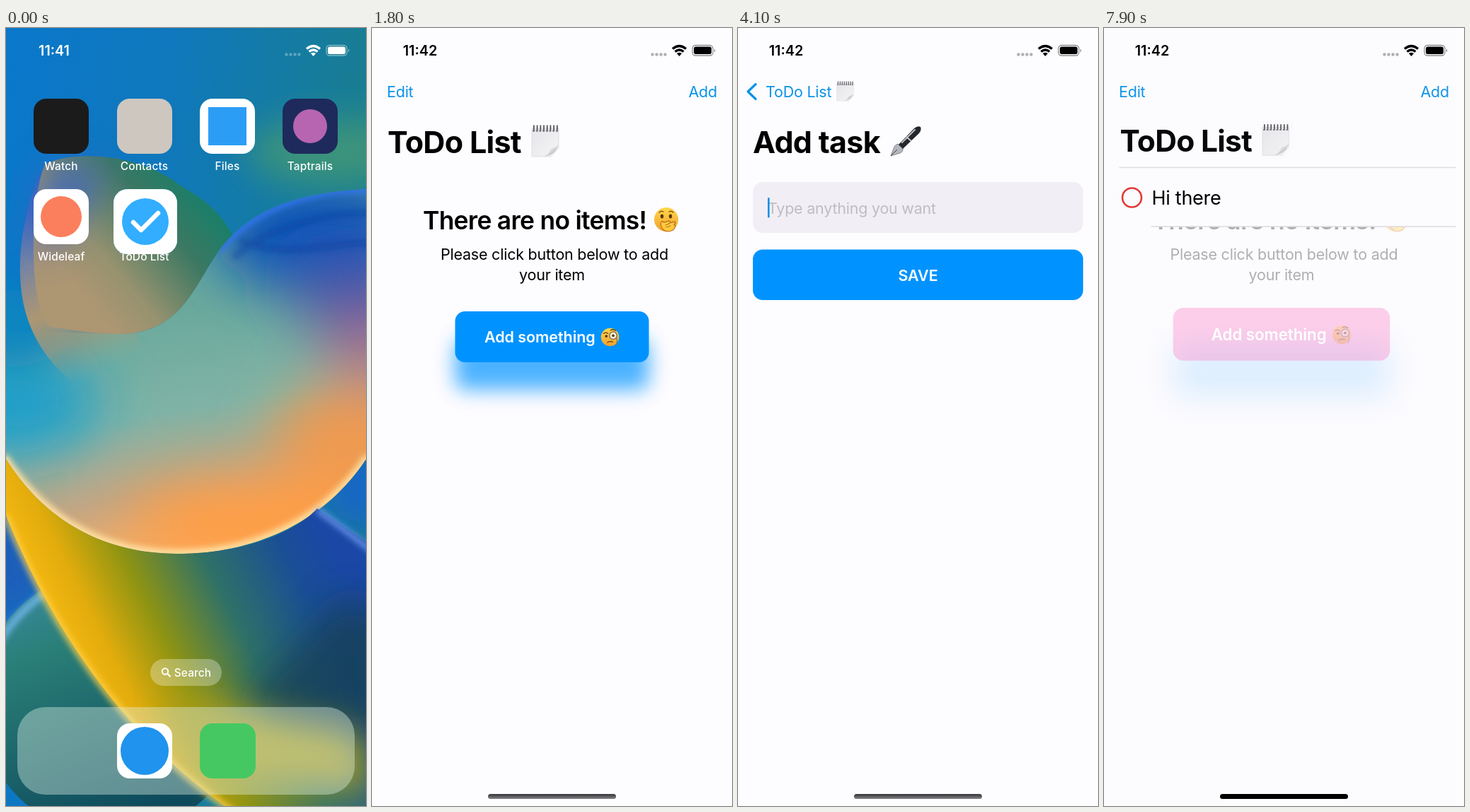
Write an HTML page that moves like this. It is 509 by 1101 pixels and loops after 8000 ms.

```html
<!DOCTYPE html>
<html lang="en">
<head>
<meta charset="utf-8">
<title>ToDo List</title>
<style>
  html, body { margin: 0; width: 100%; height: 100%; overflow: hidden; background: #fdfcff; }
  svg { display: block; }
  #scene { width: 509px; height: 1101px; }
  text {
    font-family: Inter, "Open Sans", sans-serif; font-size: 21.5px; letter-spacing: -.0105em;
    font-optical-sizing: none; dominant-baseline: central; white-space: pre;
  }
  .mid { text-anchor: middle; }
  .semi { font-weight: 600; letter-spacing: -.003em; }
  .big { font-size: 43px; font-weight: 700; letter-spacing: -.016em; }
  .head { font-size: 35.4px; font-weight: 600; letter-spacing: -.02em; }
  .entry { font-size: 27px; }
  .time { font-size: 19.8px; font-weight: 600; letter-spacing: 0; text-anchor: middle; }
  .label text { font-size: 15.4px; font-weight: 500; letter-spacing: .01em; text-anchor: middle; fill: #fff; }
  .blue { fill: #0a93e8; }
  .line { fill: none; stroke-linecap: round; stroke-linejoin: round; }
  .soft { filter: url(#soft); }
  .haze { filter: url(#haze); }
  .rim { fill: none; filter: url(#rim); }
</style>
</head>
<body>
<svg id="scene" viewBox="0 0 509 1101" xmlns="http://www.w3.org/2000/svg">
  <defs>
    <filter id="soft" x="-60%" y="-60%" width="220%" height="220%"><feGaussianBlur stdDeviation="26"/></filter>
    <filter id="haze" x="-60%" y="-60%" width="220%" height="220%"><feGaussianBlur stdDeviation="40"/></filter>
    <filter id="rim" x="-20%" y="-20%" width="140%" height="140%"><feGaussianBlur stdDeviation="4"/></filter>
    <filter id="glow" filterUnits="userSpaceOnUse" x="-100" y="280" width="709" height="450">
      <feGaussianBlur id="glowBlur" stdDeviation="14"/>
    </filter>
    <linearGradient id="sky" x2="1" y2=".25">
      <stop offset="0" stop-color="#0877cf"/><stop offset=".45" stop-color="#0f78bd"/><stop offset="1" stop-color="#1b7f86"/>
    </linearGradient>
    <linearGradient id="ring" gradientUnits="userSpaceOnUse" x1="50" y1="250" x2="170" y2="510">
      <stop offset="0" stop-color="#3c68c0"/><stop offset=".25" stop-color="#7b86a0"/>
      <stop offset=".5" stop-color="#ad9672"/><stop offset=".68" stop-color="#a39b7c" stop-opacity=".7"/>
      <stop offset=".88" stop-color="#8aa890" stop-opacity="0"/>
    </linearGradient>
    <linearGradient id="dome" gradientUnits="userSpaceOnUse" x1="290" y1="230" x2="110" y2="380">
      <stop offset="0" stop-color="#12806a"/><stop offset=".35" stop-color="#3c7862"/>
      <stop offset=".75" stop-color="#97926f"/><stop offset="1" stop-color="#ad9672"/>
    </linearGradient>
    <linearGradient id="body" gradientUnits="userSpaceOnUse" x1="200" y1="400" x2="260" y2="740">
      <stop offset="0" stop-color="#6aa99c"/><stop offset=".42" stop-color="#7fb3a6"/>
      <stop offset=".75" stop-color="#c2a684"/><stop offset="1" stop-color="#fbb066"/>
    </linearGradient>
    <linearGradient id="band" gradientUnits="userSpaceOnUse" x1="60" y1="880" x2="440" y2="690">
      <stop offset="0" stop-color="#fdbd14"/><stop offset=".18" stop-color="#e2ac0c"/><stop offset=".36" stop-color="#8f9412"/>
      <stop offset=".6" stop-color="#2f7167"/><stop offset=".85" stop-color="#1a4f96"/><stop offset="1" stop-color="#1b47a6"/>
    </linearGradient>
    <linearGradient id="ball" x2=".4" y2="1">
      <stop offset="0" stop-color="#3f8fb0"/><stop offset=".35" stop-color="#2a7f78"/><stop offset="1" stop-color="#0d4a5c"/>
    </linearGradient>
    <linearGradient id="paper" x2="1" y2="1"><stop offset="0" stop-color="#e6e6ea"/><stop offset="1" stop-color="#f4f4f6"/></linearGradient>
    <linearGradient id="curl" x2="1" y2="1"><stop offset=".3" stop-color="#fff"/><stop offset="1" stop-color="#8f9097"/></linearGradient>
    <linearGradient id="skin" x2="0" y2="1"><stop offset="0" stop-color="#ffd84a"/><stop offset="1" stop-color="#f0a02c"/></linearGradient>
    <linearGradient id="ink" x2=".7" y2=".7"><stop offset=".25" stop-color="#8d9198"/><stop offset=".6" stop-color="#25272c"/></linearGradient>
    <linearGradient id="grip" x2="0" y2="1"><stop offset="0" stop-color="#333336"/><stop offset="1" stop-color="#85858a"/></linearGradient>
    <clipPath id="bodyClip"><path id="bodyPath" d="M-60 430H60L160 433C262 433 270 340 320 293C365 250 430 225 570 227V500Q550 560 509 610C450 700 350 744 243 744C130 744 50 690 0 610L-60 560Z"/></clipPath>
    <clipPath id="window"><rect id="frame"/></clipPath>

    <symbol id="note" viewBox="0 0 40 46">
      <path d="M1 5H39V33Q34 38 28 45H1Z" fill="url(#paper)" stroke="#d2d2d8" stroke-width=".6"/>
      <path d="M39 27Q35 44 16 45Q27 42 28 33Q36 33 39 27Z" fill="url(#curl)"/>
      <path d="M3 5H38" stroke="#55565c" stroke-width="9" stroke-dasharray="1.8 2.9"/>
      <path d="M2 8.5H38" stroke="#77787e" stroke-width="2" stroke-dasharray="2.6 2.1"/>
    </symbol>
    <symbol id="hush" viewBox="0 0 36 36">
      <circle cx="18" cy="18" r="17" fill="url(#skin)"/>
      <g fill="#5b3512"><ellipse cx="12" cy="13.5" rx="2.2" ry="3"/><ellipse cx="24" cy="13.5" rx="2.2" ry="3"/></g>
      <path class="line" d="M8 8Q11 5 14 7M22 7Q25 5 28 8" stroke="#8a541c" stroke-width="1.4"/>
      <path d="M10 24Q11 19 15 22L22 20Q25 21 23 23L30 21Q32 23 29 25L31 27Q30 34 21 35Q12 35 10 24Z" fill="#ffc93c" stroke="#b8691c" stroke-width="1.2"/>
      <path class="line" d="M22 24L17 26M24 27L18 29" stroke="#b8691c" stroke-width="1"/>
    </symbol>
    <symbol id="monocle" viewBox="0 0 36 36">
      <circle cx="18" cy="18" r="17" fill="url(#skin)"/>
      <circle cx="24" cy="15" r="7" fill="#fff3cf" stroke="#77716b" stroke-width="2"/>
      <path class="line" d="M30 19Q33 27 29 33" stroke="#77716b" stroke-width="1.5"/>
      <g fill="#5b3512"><circle cx="11" cy="16" r="2.5"/><circle cx="24" cy="15" r="2.5"/></g>
      <path class="line" d="M6 11Q10 8 14 11M19 5Q24 2 29 6M13 28Q18 25 23 27" stroke="#6b3c12" stroke-width="1.8"/>
    </symbol>
    <symbol id="pen" viewBox="0 0 44 44">
      <path d="M1 43L6 30Q9 25 13 27L18 32Q19 37 14 39Z" fill="#b4b7bd" stroke="#70747b" stroke-width=".8"/>
      <path d="M1 43L10 34" stroke="#444" stroke-width="1"/>
      <path d="M12 27L34 4Q39 0 43 2Q45 6 41 11L18 33Z" fill="url(#ink)"/>
      <path d="M17 24L35 6" stroke="#b9bdc4" stroke-width="2.2" stroke-linecap="round"/>
      <path d="M23 16L30 22" stroke="#c5c8cd" stroke-width="2"/>
    </symbol>
    <g id="signal">
      <g opacity=".3" fill="currentColor"><circle cx="396.500" cy="37.500" r="2.200"/><circle cx="402.500" cy="37.500" r="2.200"/><circle cx="408.500" cy="37.500" r="2.200"/><circle cx="414.500" cy="37.500" r="2.200"/></g>
      <g fill="none" stroke="currentColor" stroke-width="3.2"><path d="M425 29.500Q434.500 21.500 444 29.500M428.500 33.500Q434.500 28.500 440.500 33.500"/></g>
      <path d="M431 36Q434.500 33.500 438 36L434.500 40Z" fill="currentColor"/>
      <rect x="453" y="24.500" width="29" height="14.500" rx="4.500" fill="none" stroke="currentColor" stroke-opacity=".45" stroke-width="1.300"/>
      <rect x="455" y="26.500" width="25" height="10.500" rx="2.800" fill="currentColor"/>
      <path d="M484 29.500Q486.500 32 484 34.500Z" fill="currentColor" opacity=".5"/>
    </g>
  </defs>

  <g id="home">
    <rect x="-60" y="-60" width="629" height="1221" fill="url(#sky)"/>
    <g class="soft">
      <ellipse cx="460" cy="175" rx="120" ry="45" fill="#3d9479"/>
      <ellipse cx="500" cy="650" rx="60" ry="70" fill="#1767c4"/>
      <ellipse cx="0" cy="760" rx="70" ry="80" fill="#1c5fba"/>
    </g>
    <use href="#bodyPath" fill="url(#body)"/>
    <g clip-path="url(#bodyClip)">
      <g class="haze">
        <ellipse cx="0" cy="530" rx="130" ry="75" fill="#1d9fcb"/>
        <ellipse cx="440" cy="290" rx="150" ry="85" fill="#0f55b8"/>
        <ellipse cx="500" cy="385" rx="90" ry="55" fill="#4b5aa6"/>
        <ellipse cx="515" cy="455" rx="65" ry="45" fill="#a9708a"/>
        <ellipse cx="490" cy="580" rx="110" ry="75" fill="#f09a50"/>
        <ellipse cx="360" cy="700" rx="190" ry="60" fill="#ff9d45"/>
      </g>
      <path class="rim" d="M322 325C360 290 430 262 520 262M330 300C400 330 470 300 520 305" stroke="#093f9f" stroke-width="7" opacity=".6"/>
      <path class="rim" d="M300 315C345 262 420 225 520 229" stroke="#2f74e8" stroke-width="10"/>
      <path class="rim" d="M-4 606C50 690 130 744 243 744C350 744 450 700 513 606" stroke="#ffe0a0" stroke-width="12"/>
    </g>
    <ellipse class="soft" cx="0" cy="425" rx="95" ry="55" fill="#0a86c0"/>
    <path d="M55 193C20 260 10 350 30 410C50 470 95 512 150 530L190 450L150 300Z" fill="url(#ring)"/>
    <path d="M55 193C95 172 190 178 245 222C285 245 306 265 320 293C270 340 262 433 160 433C125 433 100 428 62 423C35 405 30 255 55 193Z" fill="url(#dome)"/>
    <path class="soft" d="M50 205C95 185 130 190 140 200C120 260 70 315 40 320Z" fill="#3763c4" opacity=".85"/>
    <circle cx="150" cy="955" r="188" fill="url(#ball)"/>
    <path class="rim" d="M-40 945Q-15 845 60 797" stroke="#6fb4e8" stroke-width="9"/>
    <path d="M-40 560L0 610C50 690 130 744 243 744C340 744 410 712 440 680Q475 705 560 760V1150H390C215 1060 80 890 0 690L-40 600Z" fill="url(#band)"/>
    <path class="soft" d="M330 960L480 800L560 840V1010L400 1010Z" fill="#173f55" opacity=".8"/>
    <path class="soft" d="M230 950L500 1000L520 1080L300 1060Z" fill="#ad9f24"/>
    <path class="rim" d="M0 690C80 890 215 1060 390 1150" stroke="#ffd04a" stroke-width="7"/>
    <path class="rim" d="M440 682Q475 707 520 742" stroke="#6e9cf0" stroke-width="7"/>

    <g id="tiles">
      <text class="time" x="68" y="32" fill="#fff">11:41</text>
      <use href="#signal" color="#fff"/>
      <rect x="39" y="100" width="78" height="78" rx="18" fill="#1b1b1c"/>
      <rect x="157" y="100" width="78" height="78" rx="18" fill="#cdc7c0"/>
      <rect x="274" y="100" width="78" height="78" rx="18" fill="#fff"/>
      <rect x="286" y="112" width="54" height="54" fill="#2c9df5"/>
      <rect x="391" y="100" width="78" height="78" rx="18" fill="#1e2a5c"/>
      <circle cx="430" cy="139" r="24" fill="#b765b0"/>
      <rect x="39" y="228" width="78" height="78" rx="18" fill="#fff"/>
      <circle cx="78" cy="267" r="29" fill="#fb7f5c"/>
      <g class="label">
        <text x="78" y="195">Watch</text><text x="195.500" y="195">Contacts</text>
        <text x="313" y="195">Files</text><text x="430" y="195">Taptrails</text>
        <text x="78" y="323">Wideleaf</text><text x="195.500" y="323">ToDo List</text>
      </g>
      <rect x="204" y="893" width="101" height="38" rx="19" fill="#fff" fill-opacity=".3"/>
      <g class="label"><text x="264" y="912">Search</text></g>
      <path class="line" d="M228.500 914L232 917.500" stroke="#fff" stroke-width="2.200"/>
      <circle cx="225" cy="910.500" r="4.200" fill="none" stroke="#fff" stroke-width="2"/>
      <rect x="16" y="961" width="477" height="124" rx="40" fill="#dff0e4" fill-opacity=".4"/>
      <rect x="157" y="984" width="78" height="78" rx="18" fill="#fff"/>
      <circle cx="196" cy="1023" r="34" fill="#1f93ee"/>
      <rect x="274" y="984" width="79" height="78" rx="18" fill="#45c862"/>
    </g>
  </g>

  <g id="app" clip-path="url(#window)">
    <g id="stage">
      <rect width="509" height="1140" fill="#fdfcff"/>
      <g id="listPage">
        <rect width="509" height="1101" fill="#fdfcff"/>
        <g id="empty">
          <text class="head" x="72" y="272">There are no items!</text>
          <use href="#hush" x="398" y="253" width="36" height="36"/>
          <text x="97" y="320">Please click button below to add</text>
          <text class="mid" x="254.500" y="349">your item</text>
        </g>
        <g id="button">
          <rect id="shadow" y="440" height="72" rx="14" filter="url(#glow)"/>
          <rect id="face" y="401" height="72" rx="14"/>
          <text class="semi" x="159" y="437" fill="#fff">Add something</text>
          <use id="wink" href="#monocle" x="323" y="424" width="27" height="27"/>
        </g>
        <g id="row">
          <rect y="197" width="509" height="84" fill="#fdfcff"/>
          <path d="M25 197.500H509M70 281H509" stroke="#dedde1" stroke-width="1.500"/>
          <circle cx="43" cy="240" r="13.500" fill="none" stroke="#e23b35" stroke-width="2.600"/>
          <text class="entry" x="71" y="240">Hi there</text>
        </g>
      </g>
      <rect id="dim" width="509" height="1101"/>
      <g id="addPage">
        <rect width="509" height="1101" fill="#fdfcff"/>
        <g id="addTitle">
          <text class="big" x="21" y="161">Add task</text>
          <use href="#pen" x="215" y="138" width="44" height="44"/>
        </g>
        <rect x="21" y="218" width="467" height="72" rx="14" fill="#f1eff5"/>
        <text id="hint" x="42" y="255" fill="#bebdc2">Type anything you want</text>
        <text id="typed" x="42" y="255"></text>
        <rect id="caret" y="240" width="2.600" height="28.500" rx="1.300" fill="#1590e6"/>
        <rect x="21" y="313.500" width="467" height="71.500" rx="14" fill="#0093ff"/>
        <text class="semi mid" x="254.500" y="350" fill="#fff">SAVE</text>
      </g>
      <g id="bar" class="blue">
        <text x="21" y="90">Edit</text>
        <text x="488" y="90" text-anchor="end">Add</text>
      </g>
      <g id="largeTitle">
        <text class="big" x="0" y="0">ToDo List</text>
        <use href="#note" x="203" y="-24" width="40" height="46"/>
      </g>
      <g id="backTitle">
        <text class="blue" x="0" y="0">ToDo List</text>
        <use href="#note" x="100" y="-15" width="25" height="29"/>
      </g>
      <path id="chevron" class="line" d="M25 79.500L14 90L25 100.500" stroke="#0a93e8" stroke-width="3.200"/>
      <g id="splash">
        <rect width="509" height="1140" fill="#0593f3"/>
        <circle cx="255" cy="552.500" r="84.700" fill="#fff"/>
        <path class="line" d="M222 558L245 587L287 523" stroke="#0593f3" stroke-width="14"/>
      </g>
      <g id="status">
        <text id="clock" class="time" x="68" y="32"></text>
        <use href="#signal" color="#000"/>
      </g>
    </g>
    <g id="foot"><rect id="handle" x="164" y="-17" width="181" height="7" rx="3.500"/></g>
    <g id="icon">
      <rect x="0" y="-90" width="90" height="270" fill="#fff"/>
      <circle cx="45" cy="45" r="33" fill="#32adff"/>
      <path class="line" d="M28 46L39 57L63 33" stroke="#fff" stroke-width="6.500"/>
    </g>
  </g>
</svg>

<script>
const W = 509, H = 1101, LOOP = 8000, STEP = 100;
const OPEN = 0, PULSE = 1800, PUSH = 2950, FOCUS = 3900, POP = 7450;
const MESSAGE = "Hi there";
const KEYS = [4800, 4900, 5100, 5300, 5400, 5600, 5700, 5900];
const BLUE = [0, 147, 255], PINK = [255, 105, 190];

const el = {};
document.querySelectorAll("[id]").forEach(n => el[n.id] = n);

const clamp = x => Math.min(1, Math.max(0, x));
const ramp = (t, a, b) => clamp((t - a) / (b - a));
const mix = (a, b, p) => a + (b - a) * p;
const smooth = x => x * x * (3 - 2 * x);
const tint = p => `rgb(${BLUE.map((c, i) => Math.round(mix(c, PINK[i], p)))})`;

// Critically damped spring, from 0 to 1
function spring(ms, rate = 0.0126) {
  const k = Math.max(0, ms) * rate, x = 1 - (1 + k) * Math.exp(-k);
  return x > 0.998 ? 1 : x;
}
function set(node, attrs) {
  for (const key in attrs) node.setAttribute(key, attrs[key]);
}
const place = (node, x, y, s = 1) => set(node, { transform: `translate(${x} ${y}) scale(${s})` });

// The window grows about its moving centre, a little slower in height
function drawLaunch(t) {
  const p = spring(t - OPEN), q = spring(t - OPEN, 0.0118);
  const w = mix(90, W, p), h = mix(92, H, q), s = w / W;
  const x = mix(197, W / 2, p) - w / 2, y = mix(274, H / 2, p) - h / 2;
  set(el.frame, { x, y, width: w, height: h, rx: q < 1 ? mix(20, 70, p) : 0 });
  place(el.stage, x, y, s);
  place(el.foot, x, y + h, s);
  place(el.icon, x, y + (h - w) / 2, w / 90);
  set(el.icon, { opacity: 1 - ramp(t, 80, 280) });
  set(el.splash, { opacity: ramp(t, 600, 350) });
  set(el.status, { opacity: ramp(t, 100, 300) });
  const zoom = 1 + 0.1 * p;
  place(el.home, W / 2 * (1 - zoom), H / 2 * (1 - zoom), zoom);
  set(el.tiles, { opacity: 1 - p });
  el.home.style.filter = p > 0 ? `blur(${14 * p}px) brightness(${1 - 0.55 * p})` : "none";
  el.home.style.display = q < 1 ? "" : "none";
}

function drawButton(t) {
  const back = t >= POP;
  const p = back ? (t - 7300) / 1500 : smooth(ramp(t, PULSE, PULSE + 2000));
  const fade = 1 - 0.7 * ramp(t, POP, POP + 450);
  const width = 274 + 52 * p, x = (W - width) / 2, s = 1 + 0.1 * p;
  place(el.button, W / 2 * (1 - s), 437 * (1 - s) - 9 * p, s);
  set(el.face, { x, width, fill: tint(back ? 1 : p), opacity: fade });
  set(el.shadow, { x, width, y: 440 + 26 * p, fill: tint(back ? 0 : p), opacity: (back ? 0.4 : 0.7) * fade });
  set(el.glowBlur, { stdDeviation: 14 + 18 * p });
  set(el.wink, { opacity: fade });
  set(el.empty, { opacity: fade });
}

function drawPages(t) {
  const p = t < POP ? spring(t - PUSH) : 1 - spring(t - POP);
  const shift = W * (1 - p);
  place(el.listPage, -0.3 * W * p, 0);
  place(el.addPage, shift, 0);
  place(el.addTitle, 0.15 * shift, 0);
  set(el.dim, { opacity: 0.09 * p });
  set(el.bar, { opacity: 1 - p });
  const tx = mix(22, 39, p), ty = mix(161, 90, p);
  place(el.largeTitle, tx, ty, 1 - 0.5 * p);
  place(el.backTitle, tx, ty, 2 - p);
  set(el.largeTitle, { opacity: 1 - p });
  set(el.backTitle, { opacity: p });
  set(el.chevron, { opacity: ramp(p, 0.85, 1) });
  set(el.row, { opacity: ramp(t, POP, POP + 300) });
}

function drawField(t) {
  const count = KEYS.filter(k => k <= t).length;
  el.typed.textContent = MESSAGE.slice(0, count);
  set(el.hint, { opacity: count ? 0 : 1 });
  const blink = 1 - ramp(t, 6650, 6800) + ramp(t, 6950, 7300);
  set(el.caret, {
    x: 42 + (count ? el.typed.getComputedTextLength() : 0),
    opacity: t < FOCUS || t >= POP ? 0 : blink
  });
}

function draw() {
  // The picture advances ten times a second
  const t = Math.floor((performance.now() - start + 10) / STEP) * STEP % LOOP;
  drawLaunch(t);
  drawButton(t);
  drawPages(t);
  drawField(t);
  el.clock.textContent = t < 1400 ? "11:41" : "11:42";
  set(el.handle, { fill: t < POP ? "url(#grip)" : "#000" });
  requestAnimationFrame(draw);
}
const start = performance.now();
draw();
</script>
</body>
</html>
```
